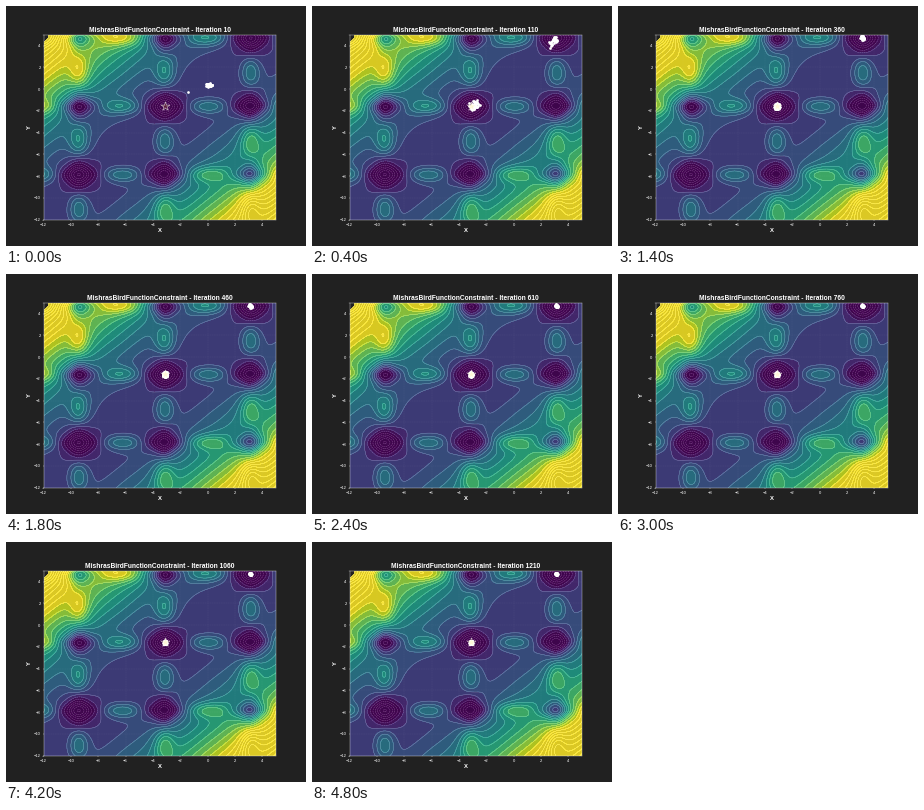
A matplotlib script for the animation above (5000 ms loop, 300 px wide and 240 px high).

```python
import numpy as np
import matplotlib.pyplot as plt
from matplotlib.animation import FuncAnimation

plt.rcParams["font.family"] = "Liberation Sans"
plt.rcParams["toolbar"] = "None"

FRAMES, INTERVAL = 25, 200
BACKGROUND = "#212121"
LOW, HIGH = -12, 5
GLOBAL_MIN = np.array([-3.13, -1.58])
LOCAL_MIN = np.array([3.12, 4.72])


def bird(x, y):
    return (np.sin(y) * np.exp((1 - np.cos(x)) ** 2)
            + np.cos(x) * np.exp((1 - np.sin(y)) ** 2)
            + (x - y) ** 2)


fig, ax = plt.subplots(figsize=(10, 8), dpi=30, facecolor=BACKGROUND)
ax.set_facecolor(BACKGROUND)
axis = np.linspace(LOW, HIGH, 300)
x, y = np.meshgrid(axis, axis)
z = bird(x, y)
vmin, vmax = np.percentile(z, [5, 95])
levels = np.arange(-120, 301, 15)
ax.contourf(x, y, z, levels=levels, cmap="viridis", vmin=vmin, vmax=vmax, alpha=0.85)
ax.contour(x, y, z, levels=levels, colors="white", linewidths=1, alpha=0.4)
ax.grid(color="white", linestyle="--", linewidth=0.8, alpha=0.1)
ax.set(xlim=(LOW, HIGH), ylim=(LOW, HIGH))
ax.set_xlabel("X", color="white", fontsize=14, fontweight="bold")
ax.set_ylabel("Y", color="white", fontsize=14, fontweight="bold")
ax.tick_params(colors="white", labelsize=10)
for spine in ax.spines.values():
    spine.set_color("white")
title = ax.set_title("", color="white", fontsize=16, fontweight="bold")

# Swarm: a tight start cluster that splits between two basins.
rng = np.random.default_rng(4)
COUNT, AT_GLOBAL = 80, 50
in_global = np.arange(COUNT)[:, None] < AT_GLOBAL
start = np.array([0.1, 0.38]) + rng.normal(0, 1, (COUNT, 2)) * [0.11, 0.06]
start[0] = [-1.4, -0.3]
target = np.where(in_global, GLOBAL_MIN, LOCAL_MIN)
angle = rng.uniform(0, 2 * np.pi, (COUNT, 1))
radius = np.sqrt(rng.uniform(0, 1, (COUNT, 1))) * np.where(in_global, 0.28, 0.2)
offset = radius * np.hstack([np.cos(angle), 1.25 * np.sin(angle)])
rate = rng.uniform(0.9, 2.0, (COUNT, 1))

swarm = ax.scatter(*start.T, s=42, color="white", linewidths=0, zorder=4)
ax.scatter(*GLOBAL_MIN, marker="*", s=500, facecolor=(1, 0.84, 0, 0.15),
           edgecolor=(1, 1, 1, 0.7), linewidths=1.5, zorder=5)


def update(frame):
    travel = 1 - np.exp(-rate * frame)
    spread = 0.45 + 0.8 * np.exp(-frame / 8)
    goal = target + offset * spread
    swarm.set_offsets(start + (goal - start) * travel)
    title.set_text(f"MishrasBirdFunctionConstraint - Iteration {10 + 50 * frame}")
    return swarm, title


anim = FuncAnimation(fig, update, frames=FRAMES, interval=INTERVAL,
                     repeat=True, repeat_delay=0, blit=False)
plt.show()
```
